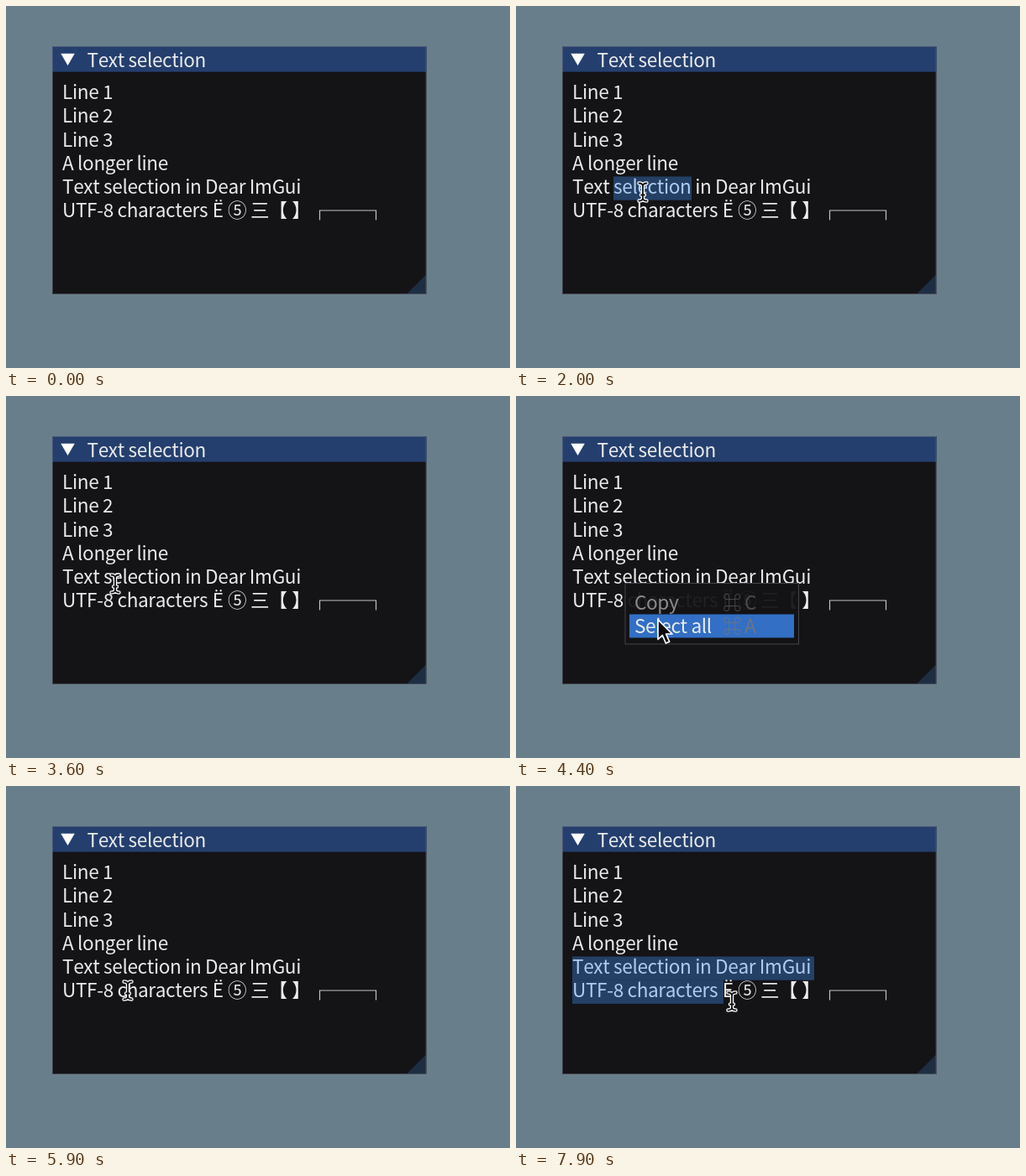
An HTML page for the animation above (8000 ms loop, 600 by 432 pixels).

```html
<!DOCTYPE html>
<html lang="en">
<head>
<meta charset="utf-8">
<title>Text selection</title>
<style>
html, body { margin: 0; width: 100%; height: 100%; overflow: hidden; background: #687f8b; }
svg { display: block; width: 600px; height: 432px; }
text {
  font: 22.6px "Noto Sans CJK JP", "Noto Sans CJK SC", "Noto Sans CJK", "Noto Sans", sans-serif;
  font-kerning: none;
  letter-spacing: -.37px;
  fill: #ebebec;
  white-space: pre;
}
.sel { fill: rgba(66, 150, 250, .35); }
.sel rect { height: 28.2px; }
.dim text { fill: #8c8c8e; }
.dim .key { fill: #4c4c4f; }
.hot .key { fill: #6b7683; }

.word, .line, .all, .menu, .beam, .arrow, .drag1, .drag2, .cursor {
  animation: 8s step-end infinite;
}
.word { animation-name: word; }
.line { animation-name: line; }
.all { animation-name: all; }
.menu { animation-name: menu; }
.beam { animation-name: beam; }
.arrow { animation-name: arrow; }
.drag1 { animation-name: drag1; }
.drag2 { animation-name: drag2; }
.cursor { animation-name: move; animation-timing-function: linear; }

@keyframes word { 0%, 32.4% { visibility: hidden } 21.2% { visibility: visible } }
@keyframes line { 0%, 42.4% { visibility: hidden } 32.4% { visibility: visible } }
@keyframes menu { 0%, 56.2% { visibility: hidden } 47.4% { visibility: visible } }
@keyframes all { 0%, 73.7% { visibility: hidden } 56.2% { visibility: visible } }
@keyframes beam {
  0%, 47.4% { visibility: hidden }
  10.6%, 56.2% { visibility: visible }
}
@keyframes arrow {
  0%, 47.4% { visibility: visible }
  10.6%, 56.2% { visibility: hidden }
}

/* selection ends snap to character edges */
@keyframes drag1 {
  0% { width: 0 }
  83% { width: 13px }
  84.9% { width: 25px }
  86.2% { width: 44px }
  87.4% { width: 59px }
  88.7%, 100% { width: 288px }
}
@keyframes drag2 {
  0% { width: 0 }
  88.7% { width: 77.5px }
  89.6% { width: 91px }
  91.2% { width: 112px }
  92.4% { width: 124px }
  93.7% { width: 144px }
  94.9% { width: 156px }
  96.2% { width: 165px }
  97.4%, 100% { width: 180px }
}
@keyframes move {
  0%, 8.7% { transform: translate(190px, 470px) }
  8.71% { transform: translate(190px, 384px) }
  13.75% { transform: translate(170px, 272px) }
  18.75%, 27.5% { transform: translate(151px, 222px) }
  31.25%, 49% { transform: translate(130px, 224px) }
  54.5%, 58% { transform: translate(169px, 267px) }
  65%, 74% { transform: translate(145px, 244px) }
  80%, 81.5% { transform: translate(71px, 223px) }
  85% { transform: translate(98px, 224px) }
  88.75% { transform: translate(150px, 233px) }
  91.25% { transform: translate(185px, 243px) }
  96.25% { transform: translate(240px, 255px) }
  98.75%, 100% { transform: translate(257px, 257px) }
}
</style>
</head>
<body>
<svg viewBox="0 0 600 432">
  <defs>
    <path id="ibeam" d="M-4.5-10.5Q0-10.5 0-7V7Q0 10.5-4.5 10.5M4.5-10.5Q0-10.5 0-7M0 7Q0 10.5 4.5 10.5M-2 3.5H2"/>
  </defs>

  <rect x="55" y="48" width="445.5" height="296" fill="#141316"/>
  <rect x="55" y="48" width="445.5" height="30.6" fill="#243f6e"/>
  <path d="M477 343.5H500V320.5Z" fill="#1d2e43"/>
  <rect x="55.5" y="48.5" width="444.5" height="295" fill="none" stroke="#6e6e80" stroke-opacity=".5"/>
  <path d="M65.3 56.7H81.8L73.5 71Z" fill="#fff"/>
  <text x="96.5" y="72.6">Text selection</text>

  <text x="67" y="111.1">Line 1</text>
  <text x="67" y="139.3">Line 2</text>
  <text x="67" y="167.5">Line 3</text>
  <text x="67" y="195.7">A longer line</text>
  <text x="67" y="223.9">Text selection in Dear ImGui</text>
  <text x="67" y="252.1">UTF-8 characters</text>
  <text x="245.7" y="252.1">Ë</text>
  <text x="264" y="252.1">⑤</text>
  <text x="291" y="252.1">三</text>
  <text x="312.6" y="252.1">【</text>
  <text x="340.2" y="252.1">】</text>
  <path d="M373.5 255.5V244H440.5V255.5" fill="none" stroke="#c4c4c6" stroke-width="1.2"/>

  <g class="sel">
    <rect class="word" x="116" y="203.5" width="93"/>
    <rect class="line" x="67" y="203.5" width="283.5"/>
    <g class="all">
      <rect x="67" y="90.7" width="64"/>
      <rect x="67" y="118.9" width="64"/>
      <rect x="67" y="147.1" width="64"/>
      <rect x="67" y="175.3" width="129"/>
      <rect x="67" y="203.5" width="288"/>
      <rect x="67" y="231.7" width="386"/>
    </g>
    <rect class="drag1" x="67" y="203.5" width="0"/>
    <rect class="drag2" x="67" y="231.7" width="0"/>
  </g>

  <g class="menu">
    <rect x="130" y="223.5" width="206.5" height="72.5" fill="#141416" fill-opacity=".94" stroke="#44444b"/>
    <g class="dim">
      <text x="141" y="255.1">Copy</text>
      <text class="key" x="246" y="255.1">⌘</text>
      <text class="key" x="272" y="255.1">C</text>
    </g>
    <g class="hot">
      <rect x="135" y="260.5" width="196" height="28" fill="#326fc5"/>
      <text x="141" y="283.3">Select all</text>
      <text class="key" x="246" y="283.3">⌘</text>
      <text class="key" x="272" y="283.3">A</text>
    </g>
  </g>

  <g class="cursor">
    <g class="beam" fill="none" stroke-linecap="round">
      <use href="#ibeam" stroke="#fff" stroke-width="4.4"/>
      <use href="#ibeam" stroke="#111" stroke-width="1.8"/>
    </g>
    <path class="arrow" d="M0 0V23.5L5.3 18.5L9.4 28L13.6 26.2L9.6 17H17Z" fill="#0a0a0a" stroke="#fff" stroke-width="1.7" stroke-linejoin="round"/>
  </g>
</svg>
</body>
</html>
```
